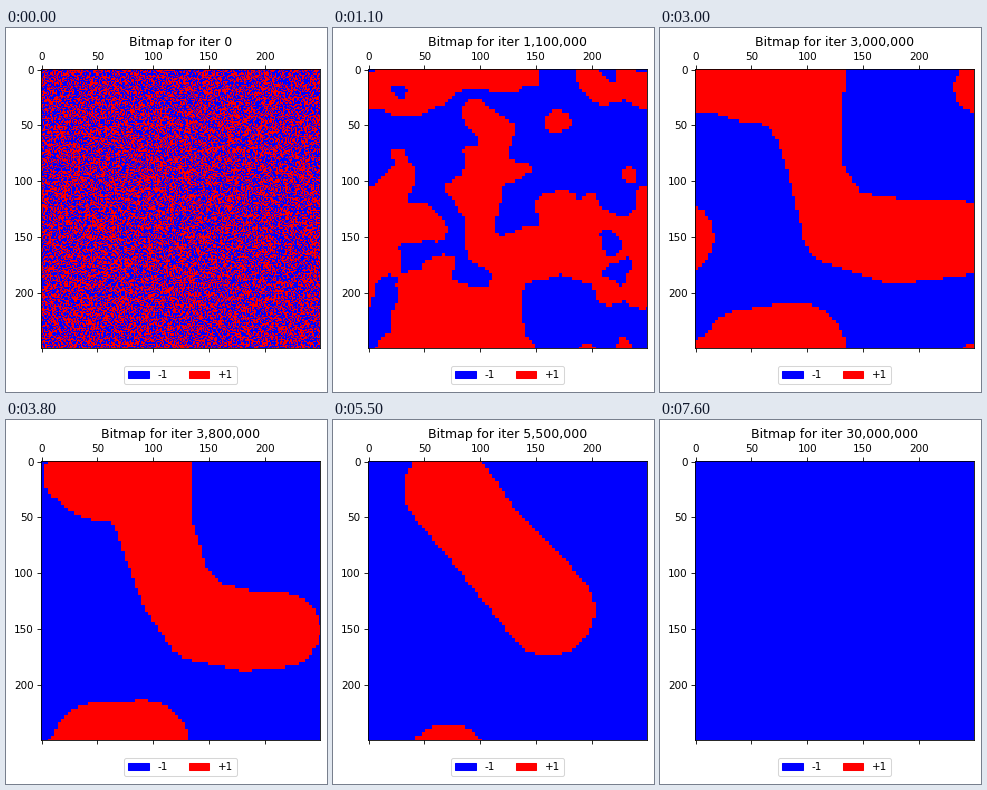
Animation of 321x364 px, one loop 7700 ms. Source, as a matplotlib script:

```python
import numpy as np
import matplotlib.pyplot as plt
from matplotlib.animation import FuncAnimation
from matplotlib.colors import ListedColormap
from matplotlib.patches import Patch

W, H, DPI = 321, 364, 75
N = 250                 # cells per side
SIDE = 279.0            # side of the lattice in pixels
LEFT, TOP = 35.1, 41.1
FRAMES, STEP = 77, 100_000

plt.rcParams["font.family"] = "DejaVu Sans"

axis = (np.arange(N) + 0.5) * SIDE / N
X, Y = np.meshgrid(axis + LEFT, axis + TOP)


def wrap(d):
    return (d + SIDE / 2) % SIDE - SIDE / 2


def stroke(*spine):
    """Signed distance on the torus to a tapered stroke through (x, y, radius)."""
    field = np.full((N, N), -np.inf)
    for a, b in zip(np.array(spine[:-1], float), np.array(spine[1:], float)):
        mx, my, mr = (a + b) / 2
        hx, hy, hr = (b - a) / 2
        dx, dy = wrap(X - mx), wrap(Y - my)
        t = np.clip((dx * hx + dy * hy) / (hx * hx + hy * hy), -1, 1)
        field = np.maximum(field, mr + t * hr - np.hypot(dx - t * hx, dy - t * hy))
    return field


# The +1 domain straightens, retracts and shrinks
TIMES = [17, 30, 38, 55, 64, 72, 75]
FIELDS = [
    stroke((-18, 54, 16), (48, 70, 26), (110, 22, 52), (148, 44, 47),
           (159, 112, 15), (142, 187, 21), (178, 232, 27), (232, 205, 44),
           (288, 236, 38), (335, 190, 30), (338, 160, 16)),
    stroke((40, 60, 25), (88, 48, 46), (134, 48, 53), (150, 105, 33),
           (156, 145, 27), (180, 200, 38), (235, 213, 43), (294, 210, 39)),
    stroke((64, 56, 27), (92, 52, 48), (136, 50, 49), (148, 105, 38),
           (170, 170, 36), (195, 200, 41), (240, 211, 40), (277, 210, 37)),
    stroke((115, 69, 44), (154, 120, 41), (216, 190, 46)),
    stroke((132, 86, 43), (192, 168, 46)),
    stroke((148, 112, 48), (165, 126, 50)),
    stroke((150, 114, 46), (161, 122, 46)),
]

noise = np.random.default_rng(7).choice([-1.0, 1.0], (N, N))
spectrum = np.fft.fft2(noise)
freq = np.fft.fftfreq(N)
FREQ2 = freq[:, None] ** 2 + freq[None, :] ** 2


def coarsened(sigma):
    """Random spins smoothed to domains of a given scale."""
    u = np.fft.ifft2(spectrum * np.exp(-2 * (np.pi * sigma) ** 2 * FREQ2)).real
    return u / u.std()


def blocky(u, size):
    """Sample the field in square blocks, for stepped domain walls."""
    k = np.minimum(np.arange(N) // size * size + size // 2, N - 1)
    return u[np.ix_(k, k)]


def spins(i):
    if i == 0:
        return noise > 0
    if i == FRAMES - 1:
        return np.zeros((N, N), bool)
    if i < TIMES[0]:
        p = (i / TIMES[0]) ** 1.5
        pull = 1.5 * np.tanh(FIELDS[0] / 12)
        u = (1 - p) * coarsened(0.22 * i ** 1.5) + p * pull
    else:
        k = min(np.searchsorted(TIMES, i, side="right") - 1, len(TIMES) - 2)
        p = (i - TIMES[k]) / (TIMES[k + 1] - TIMES[k])
        u = (1 - p) * FIELDS[k] + p * FIELDS[k + 1]
    return blocky(u, min(i, 3)) > 0


fig = plt.figure(figsize=(W / DPI, H / DPI), dpi=DPI, facecolor="white")
ax = fig.add_axes([LEFT / W, 1 - (TOP + SIDE) / H, SIDE / W, SIDE / H])
image = ax.matshow(spins(0), cmap=ListedColormap(["blue", "red"]),
                   vmin=0, vmax=1, interpolation="nearest", aspect="auto")
ax.set_xticks(range(0, N, 50))
ax.set_yticks(range(0, N, 50))
title = ax.set_title("")
ax.legend(handles=[Patch(color="blue", label="-1"), Patch(color="red", label="+1")],
          loc="upper center", bbox_to_anchor=(0.5, -0.046), ncol=2)


def draw(i):
    count = 30_000_000 if i == FRAMES - 1 else i * STEP
    image.set_data(spins(i))
    title.set_text(f"Bitmap for iter {count:,}")
    return image, title


anim = FuncAnimation(fig, draw, frames=FRAMES, interval=100,
                     repeat=True, repeat_delay=0, blit=False)
plt.show()
```
